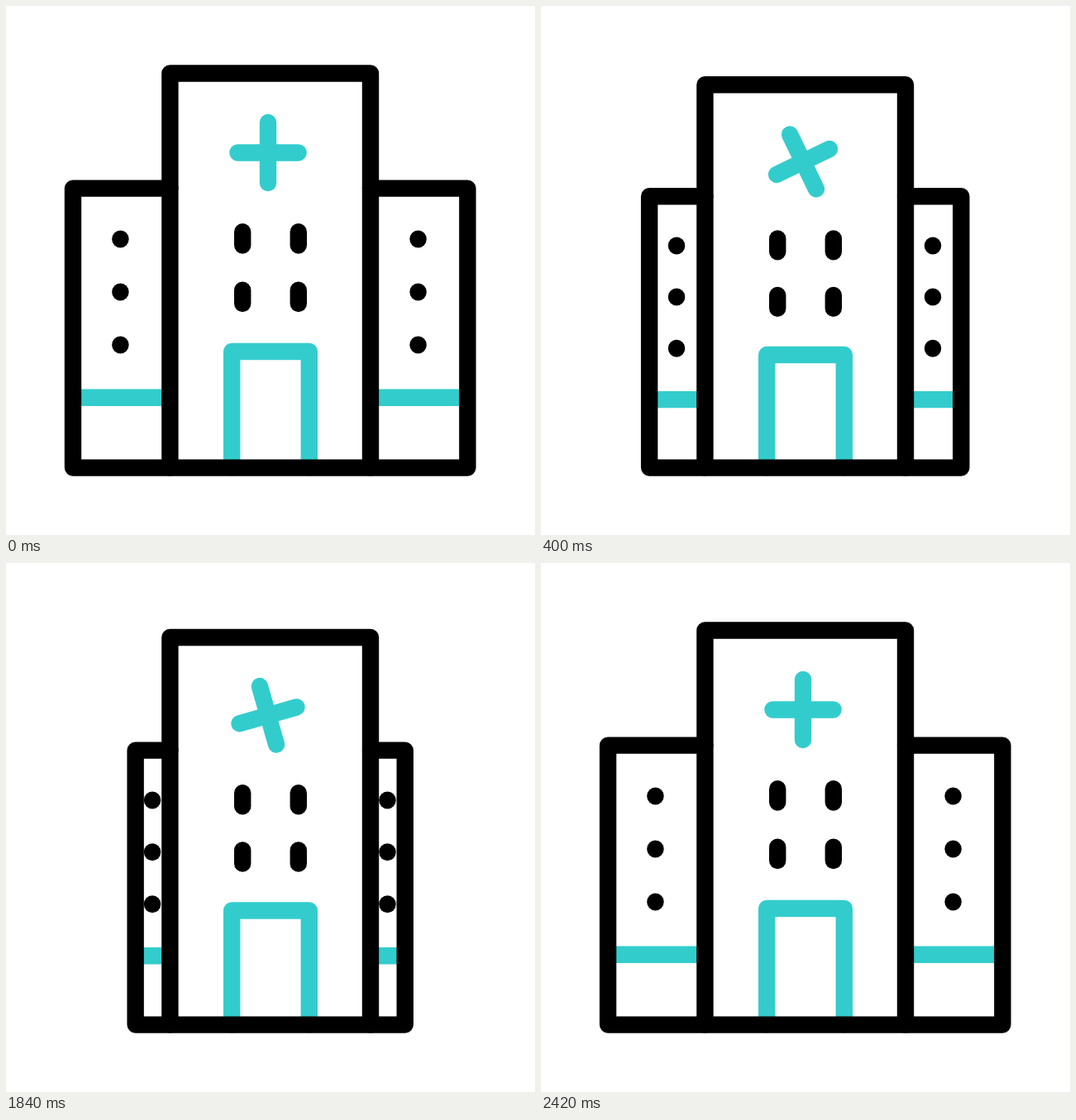
An HTML page with a canvas for the animation above (3.6 s loop, 640 by 640 pixels).

```html
<!DOCTYPE html>
<html lang="en">
<head>
<meta charset="utf-8">
<title>Hospital</title>
<style>
  html, body { margin: 0; width: 100%; height: 100%; overflow: hidden; background: #fff; }
  canvas { display: block; width: 640px; height: 640px; }
</style>
</head>
<body>
<canvas></canvas>
<script>
const LOOP = 3600, STEP = 20;
const BLACK = '#000', TEAL = '#33cccc';
const GROUND = 558.6, LEFT = 198.4, RIGHT = 441;

const canvas = document.querySelector('canvas');
const ctx = canvas.getContext('2d');
const ratio = window.devicePixelRatio || 1;
canvas.width = canvas.height = 640 * ratio;

const progress = (t, from, to) => Math.min(1, Math.max(0, (t - from) / (to - from)));
const smooth = x => x * x * (3 - 2 * x);
const settle = x => smooth(x) + 0.78 * x * (1 - x) ** 2;

// 0: wings open; 0.5: fully squashed; 1: wings folded into the tower
function foldAt(t) {
  if (t < 1000) {
    return (smooth(progress(t, 0, 265)) + smooth(progress(t, 262, 568))) / 2;
  }
  return 1 - (smooth(progress(t, 1712, 2030)) + settle(progress(t, 2030, 2430))) / 2;
}

function stroke(color, points) {
  ctx.strokeStyle = color;
  ctx.beginPath();
  points.forEach(([x, y]) => ctx.lineTo(x, y));
  ctx.stroke();
}

function draw(t) {
  const fold = foldAt(t);
  const scaleY = 1 - 0.05 * (1 - Math.abs(2 * fold - 1));
  const open = Math.max(0.004, Math.min(1, 2 - 2 * fold));
  const y = v => GROUND + (v - GROUND) * scaleY;
  // Points are squashed, line widths stay the same
  const line = (color, ...points) => stroke(color, points.map(([px, py]) => [px, y(py)]));

  ctx.setTransform(ratio, 0, 0, ratio, 0, 0);
  ctx.fillStyle = '#fff';
  ctx.fillRect(0, 0, 640, 640);
  ctx.lineWidth = 20.4;
  ctx.lineCap = ctx.lineJoin = 'round';

  for (const [hinge, side] of [[LEFT, -1], [RIGHT, 1]]) {
    const outer = hinge + side * 117.4 * open;
    const middle = hinge + side * (side < 0 ? 60 : 57.6) * open;
    ctx.lineCap = 'butt';
    line(TEAL, [hinge, 473.7], [outer, 473.7]);
    ctx.lineCap = 'round';
    line(BLACK, [hinge, 220.6], [outer, 220.6], [outer, GROUND], [hinge, GROUND]);
    for (const dotY of [282, 346, 410]) {
      line(BLACK, [middle, dotY - 0.3], [middle, dotY + 0.3]);
    }
  }

  line(TEAL, [273.2, GROUND], [273.2, 418], [366.8, 418], [366.8, GROUND]);
  line(BLACK, [LEFT, GROUND], [LEFT, 81.5], [RIGHT, 81.5], [RIGHT, GROUND], [LEFT, GROUND]);
  for (const x of [286.2, 353.8]) {
    for (const top of [273.2, 343.7]) line(BLACK, [x, top], [x, top + 16.4]);
  }

  ctx.translate(317, y(177.5));
  ctx.rotate(fold * Math.PI / 2);
  const arm = 36.6;
  stroke(TEAL, [[-arm, 0], [arm, 0]]);
  stroke(TEAL, [[0, -arm * scaleY], [0, arm * scaleY]]);
}

const start = performance.now();
function tick() {
  const elapsed = (performance.now() - start) % LOOP;
  draw(Math.floor(elapsed / STEP) * STEP);
  requestAnimationFrame(tick);
}
tick();
</script>
</body>
</html>
```
